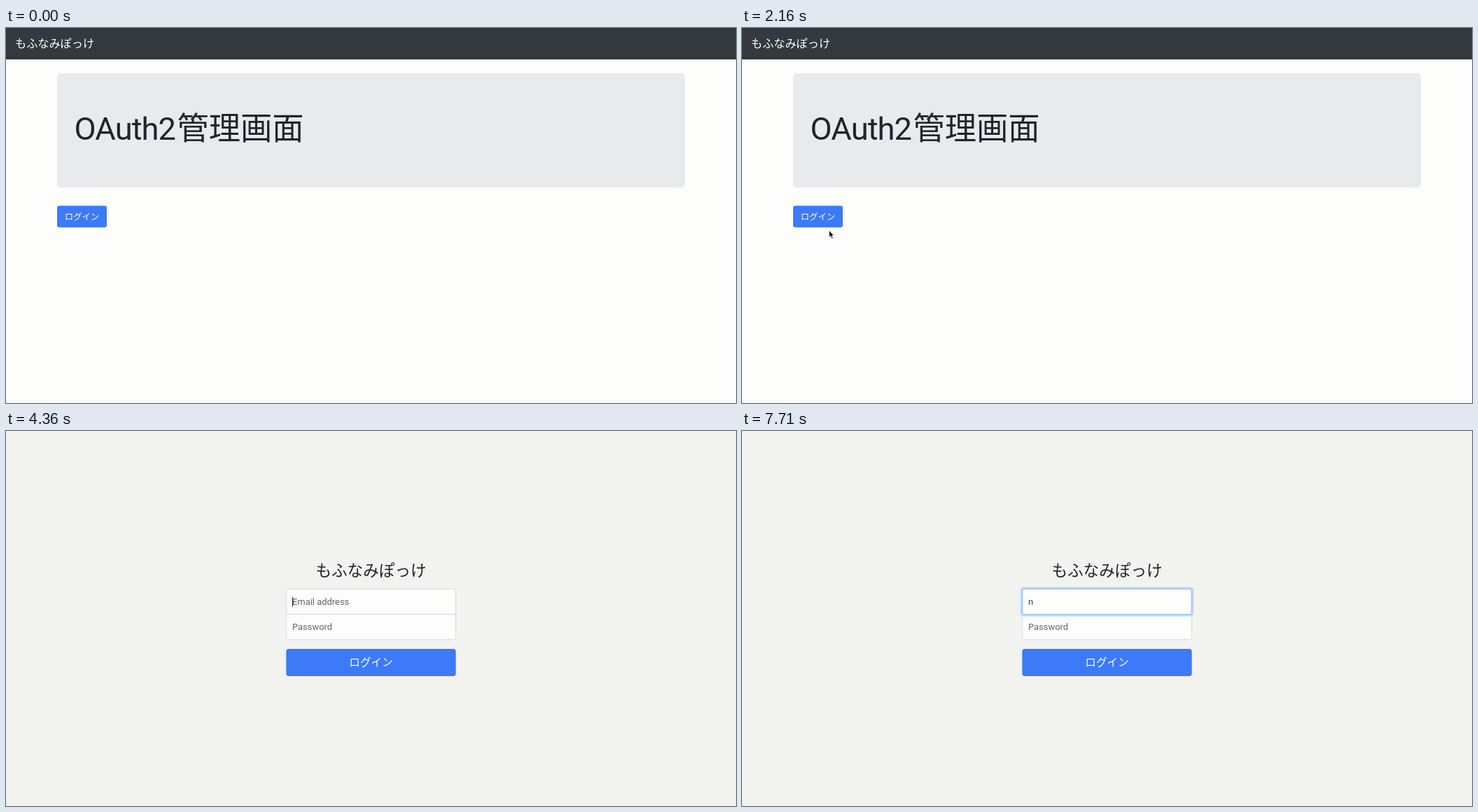
An HTML page that plays this animation: 1043 px wide and 537 px high, repeating every 8000 ms.

```html
<!DOCTYPE html>
<html lang="ja">
<head>
<meta charset="utf-8">
<title>OAuth2管理画面</title>
<style>
  html, body { margin: 0; width: 100%; height: 100%; overflow: hidden; }
  svg { display: block; width: 100%; height: 100%; font: 12.93px Roboto, "Noto Sans CJK JP", "Noto Sans CJK", sans-serif; }
  .center { text-anchor: middle; }
  .light { fill: #fdfdfc; }
  .brand { font-size: 16.16px; }
  .label { font-size: 12.4px; font-weight: 500; }
  .large { font-size: 15.6px; }
  .heading { font-size: 45.25px; font-weight: 300; fill: #212529; }
  .latin { font-weight: 400; letter-spacing: -.02em; }
  .title { font-size: 22.6px; fill: #212529; }
  .placeholder { fill: #5f666d; }
  .field { fill: #fdfdfc; stroke: #d2d8e6; stroke-width: .9; }
  .ring { fill: none; stroke-width: 2.6; }
</style>
</head>
<body>
<svg viewBox="0 0 1043 537">
  <g id="home">
    <rect width="1043" height="537" fill="#fdfdfc"/>
    <rect width="1043" height="45" fill="#33393e"/>
    <text class="light brand" x="13" y="28">もふなみぽっけ</text>
    <rect x="73" y="65" width="897" height="163.5" rx="4.8" fill="#e8eaed"/>
    <text class="heading latin" x="97.5" y="160">OAuth2</text>
    <text class="heading" x="244.5" y="160">管理画面</text>
    <rect id="buttonRing" class="ring" x="71.6" y="253.2" width="73.8" height="33.6" rx="4.4" stroke="#8fc4fb"/>
    <rect id="button" x="73" y="254.5" width="71" height="31" rx="3.2"/>
    <text class="light center label" x="108.5" y="275">ログイン</text>
  </g>
  <g id="login">
    <rect width="1043" height="537" fill="#f2f2ef"/>
    <text class="title center" x="521.5" y="207.5">もふなみぽっけ</text>
    <path class="field" d="M400.7 262.5H642.3V295.5Q642.3 298.7 639.1 298.7H403.9Q400.7 298.7 400.7 295.5Z"/>
    <path class="field" d="M400.7 262.5V229.5Q400.7 226.3 403.9 226.3H639.1Q642.3 226.3 642.3 229.5V262.5Z"/>
    <g id="inputRing">
      <rect class="ring" x="399" y="224.7" width="245" height="39.5" rx="3.5" stroke="#bbd7fb"/>
      <rect x="400.7" y="226.3" width="241.6" height="36.2" rx="2.5" fill="none" stroke="#84bcf8" stroke-width=".9"/>
    </g>
    <text id="email" x="409" y="249"></text>
    <text class="placeholder" x="409" y="285">Password</text>
    <path id="caret" d="M0 237.5V251.5" stroke="#22262a"/>
    <rect x="400.3" y="312.1" width="242.4" height="38.8" rx="3.9" fill="#3c7af7"/>
    <text class="light center label large" x="521.5" y="337">ログイン</text>
  </g>
  <g id="pointer">
    <path id="arrow" d="M0 0V10L2.3 8 4 12 5.7 11.3 4.1 7.5H7Z" fill="#111" stroke="#fff" stroke-width=".7"/>
    <path id="hand" d="M-1 1Q0-.6 1 1V5L2 4.6Q3 4.3 3.4 5.2Q4.6 4.6 5 5.8Q6.6 5.2 6.8 7V9Q6.8 11 5.5 13H-.2Q-1 11-3.4 8.4Q-3.6 6.6-1 8Z" fill="#fff" stroke="#222" stroke-width=".8"/>
    <path id="beam" d="M-2-5.5Q0-5.5 0-4.5Q0-5.5 2-5.5M0-4.5V4.5M-2 5.5Q0 5.5 0 4.5Q0 5.5 2 5.5" fill="none" stroke="#555" stroke-width=".9"/>
  </g>
</svg>
<script>
const LOOP = 8000, LOGIN_AT = 4360, TYPE_AT = 6210;
const el = id => document.getElementById(id);
const show = (id, on) => el(id).style.display = on ? '' : 'none';
const ramp = (t, from, to) => Math.min(1, Math.max(0, (t - from) / (to - from)));

// Pointer waypoints: time, x, y
const homePath = [
  [900, 1038, 52], [1050, 700, 330], [1170, 480, 404], [1270, 367, 381],
  [1380, 367, 381], [1500, 255, 369], [1570, 236, 362], [1800, 165, 325],
  [2200, 120, 286], [2310, 118, 272.5]
];
const loginPath = [[4760, 224, 270], [4950, 436, 256], [5150, 436, 256], [5320, 446, 248]];

function along(path, t) {
  const next = path.findIndex(point => point[0] > t);
  if (next < 0) return path[path.length - 1].slice(1);
  const a = path[Math.max(0, next - 1)], b = path[next];
  const k = ramp(t, a[0], b[0]);
  return [a[1] + (b[1] - a[1]) * k, a[2] + (b[2] - a[2]) * k];
}

function mix(from, to, k) {
  return `rgb(${from.map((c, i) => Math.round(c + (to[i] - c) * k))})`;
}

function draw(t) {
  const login = t >= LOGIN_AT, typed = t >= TYPE_AT;
  show('home', !login);
  show('login', login);

  el('button').setAttribute('fill', mix([60, 122, 247], [47, 101, 208], ramp(t, 2230, 2310)));
  el('buttonRing').style.opacity = ramp(t, 3930, 4080);
  el('inputRing').style.opacity = ramp(t, LOGIN_AT, 4430);

  el('email').textContent = typed ? 'n' : 'Email address';
  el('email').setAttribute('fill', typed ? '#43494f' : '#5f666d');
  const blinkStart = typed ? TYPE_AT : 4260;
  show('caret', Math.floor((t - blinkStart) / 500) % 2 === 0);
  el('caret').setAttribute('transform', `translate(${typed ? 417.5 : 409.5})`);

  const [x, y] = along(login ? loginPath : homePath, t);
  const shape = login ? (x > 400 ? 'beam' : 'arrow') : t >= 2230 ? 'hand' : 'arrow';
  for (const id of ['arrow', 'hand', 'beam']) show(id, id === shape);
  show('pointer', login ? t >= 4760 && !typed : t >= 900);
  el('pointer').setAttribute('transform', `translate(${x} ${y})`);
}

const start = performance.now();
function tick() {
  draw((performance.now() - start) % LOOP);
  requestAnimationFrame(tick);
}
tick();
</script>
</body>
</html>
```
